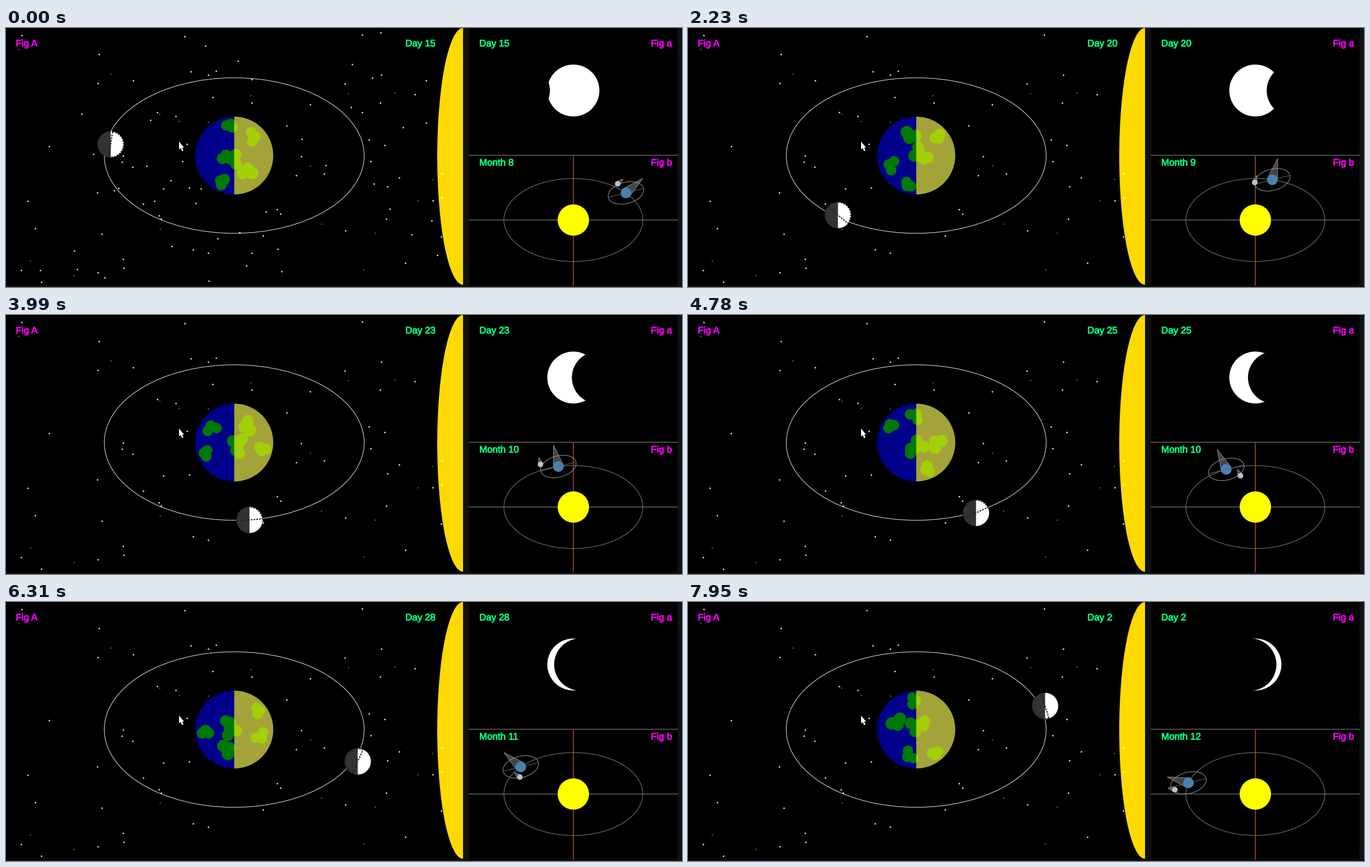
A matplotlib script that plays this animation: 1207 px wide and 464 px high, repeating every 7990 ms.

```python
from itertools import count

import matplotlib.pyplot as plt
import numpy as np
from matplotlib.animation import FuncAnimation
from matplotlib.lines import Line2D
from matplotlib.patches import Circle, Ellipse, Polygon, Rectangle, Wedge
from matplotlib.patheffects import Normal, Stroke
from matplotlib.transforms import Affine2D

W, H, DPI = 1207, 464, 64
PX = 72 / DPI  # points per pixel
FRAMES, INTERVAL = 170, 47
STEP_MS = 46.4  # one step of the orbits

EARTH = (407.5, 228.5)
MOON_PATH = (416.5, 228.5)
SUN_B = np.array([1013, 344])
PHASE = (1013, 112)
PHASE_R = 46.5

PAGE, GREY = "#111111", "#808080"
GREEN, MAGENTA = "#00ff7f", "#f400f4"

# Land masses seen from the pole: x, y, heading, spread, lobe radius
LAND = [(-8, -54, -70, 6, 9.3),
        (34, -34, -6, 8.9, 9.3),
        (24, 28.5, -90, 9, 11),
        (-22, 46.5, 210, 6, 9.8),
        (-14.5, 3, 270, 7, 10),
        (0, 6.5, 180, 9, 10.5)]

rng = np.random.default_rng(15)
fig = plt.figure(figsize=(W / DPI, H / DPI), dpi=DPI, facecolor=PAGE)
ax = fig.add_axes([0, 0, 1, 1])
ax.set(xlim=(0, W), ylim=(H, 0))
ax.axis("off")
layer = count(1)


def polar(deg, rx, ry):
    a = np.radians(deg)
    return np.array([rx * np.cos(a), ry * np.sin(a)])


def put(artist, move=None):
    """Add an artist on top, optionally carried by a moving transform."""
    artist.set_zorder(next(layer))
    if move is not None:
        artist.set_transform(move + ax.transData)
    ax.add_artist(artist)
    return artist


def box(x, y, w, h, color):
    return put(Rectangle((x, y), w, h, fc=color, lw=0))


def disc(x, y, r, color, move=None):
    return put(Circle((x, y), r, fc=color, lw=0), move)


def half(r, start, color, move, **kw):
    return put(Wedge((0, 0), r, start, start + 180, fc=color, lw=0, **kw), move)


def ring(center, rx, ry, color, angle=0):
    return put(Ellipse(center, 2 * rx, 2 * ry, angle=angle, fill=False,
                       ec=color, lw=PX))


def line(xs, ys, color, width=1, move=None, **kw):
    return put(Line2D(xs, ys, color=color, lw=width * PX, **kw), move)


def stars(n, color, r):
    xs, ys = rng.uniform(8, 780, n), rng.uniform(4, 458, n)
    return put(Line2D(xs, ys, ls="", marker="o", mew=0, ms=2 * r * PX,
                      color=color))


def land(x, y, heading, spread, r):
    """A bean of three lobes, the middle one pulled inwards."""
    for turn, reach in ((-110, 1), (0, 0.5), (110, 1)):
        dx, dy = polar(heading + turn, spread * reach, spread * reach)
        disc(x + dx, y + dy, r, "#007a00", spin)


def cone():
    return put(Polygon(np.zeros((3, 2)), fc="#444444", ec="#8a8a8a", lw=PX))


def label(x, y, s, color):
    text = plt.Text(x, y, s, color=color, family="Liberation Sans",
                    size=17 * PX, va="baseline")
    text.set_path_effects([Stroke(linewidth=0.9 * PX, foreground=color),
                           Normal()])
    return put(text)


# Left view: Earth with its moon
box(0, 0, 816, 460.5, "black")
put(Ellipse((816, 230), 92, 460, fc="#ffda00", lw=0))
stars(18, "#555555", 1.3)
stars(62, "white", 1.3)
dying = stars(47, "white", 1.3)
box(816, 0, 11, H, PAGE)
box(0, 460.5, W, 4, PAGE)
ring(EARTH, 232, 139.3, "#e8e8e8")

spin, still = Affine2D(), Affine2D().translate(*EARTH)
disc(0, 0, 69.7, "#00008b", still)
for mass in LAND:
    land(*mass)
half(69.7, -90, "#ffff0e", still, alpha=0.645)

moon_at, moon_turn = Affine2D(), Affine2D()
half(23.5, 90, "#333333", moon_at)
half(23.5, -90, "white", moon_at)
rim = polar(np.append(np.linspace(90, 270, 61), 90), 23, 23)
line(*rim, "#1e1e1e", 2, moon_turn, ls=(0, (1.5, 1)), dash_capstyle="butt")

label(17.5, 33, "Fig A", MAGENTA)
day_a = label(713, 33, "", GREEN)

put(Polygon([(309, 203.5), (309, 217.5), (312, 215), (314.3, 220.5),
             (316.8, 219.5), (314.6, 214.3), (318, 214.3)], fc="white", lw=0))

# Top right: phase of the moon
box(827, 0, 372, 460.5, "black")
disc(*PHASE, PHASE_R, "white")
shade = disc(*PHASE, PHASE_R + 0.3, "black")
day_b = label(845, 33, "", GREEN)
label(1151.5, 33, "Fig a", MAGENTA)

# Bottom right: Earth around the sun
for y in (228, SUN_B[1]):
    line([827, 1199], [y, y], "#4a4a4a", 2, snap=False)
line([SUN_B[0]] * 2, [228, 460.5], "#86362a", 2, snap=False)
ring(SUN_B, 124, 74.3, GREY)
disc(*SUN_B, 28, "yellow")
earth_cone, moon_cone = cone(), cone()
earth_b = disc(0, 0, 9.5, "steelblue")
path_b = ring((0, 0), 32.5, 19, "#9a9a9a", -15)
axis_b = line([], [], "#6a6a6a")
moon_b = disc(0, 0, 4.9, "#c0c0c0")
month = label(845, 246.5, "", GREEN)
label(1151.5, 246.5, "Fig b", MAGENTA)


def aim(tri, base, away, length, width):
    side = polar(away + 90, width, -width)
    tri.set_xy([base + side, base + polar(away, length, -length), base - side])


def update(n):
    t = n * INTERVAL
    # whole steps, with a slight lead gained at the start
    step = round(t / STEP_MS) + min(0.67, t / 1500)
    theta = 188.3 - 1.2 * step
    year = 40.8 + 0.72 * step

    spin.clear().rotate_deg(-18 * step).translate(*EARTH)
    pos = MOON_PATH + polar(theta, 232, 139)
    moon_at.clear().translate(*pos)
    moon_turn.clear().rotate_deg(theta).translate(*pos)

    red = t > 420
    dying.set_color("#ff5a2a" if red else "white")
    dying.set_markersize((3.8 if red else 2.6) * PX)
    dying.set_visible(t < 2090)

    phase = (theta + 180) % 360 - 180
    shade.set_center((PHASE[0] + 2 * PHASE_R * phase / 180, PHASE[1]))
    day = int((-theta % 360) // 12) + 1
    day_a.set_text(f"Day {day}")
    day_b.set_text(f"Day {day}")
    month.set_text(f"Month {int(year // 30) + 7}")

    home = SUN_B + polar(year, 124, -74.3)
    mate = home + polar(243 - 9 * step, 32.5, 18.3)
    earth_b.set_center(home)
    moon_b.set_center(mate)
    path_b.set_center(home)
    tip = polar(-14, 32, 32)
    axis_b.set_data(*np.transpose([home - tip, home + tip]))
    aim(earth_cone, home, year, 39.5, 9.3)
    aim(moon_cone, mate, year, 13, 4.7)
    return ()


anim = FuncAnimation(fig, update, frames=FRAMES, interval=INTERVAL,
                     repeat=True, repeat_delay=0, blit=False)
plt.show()
```
